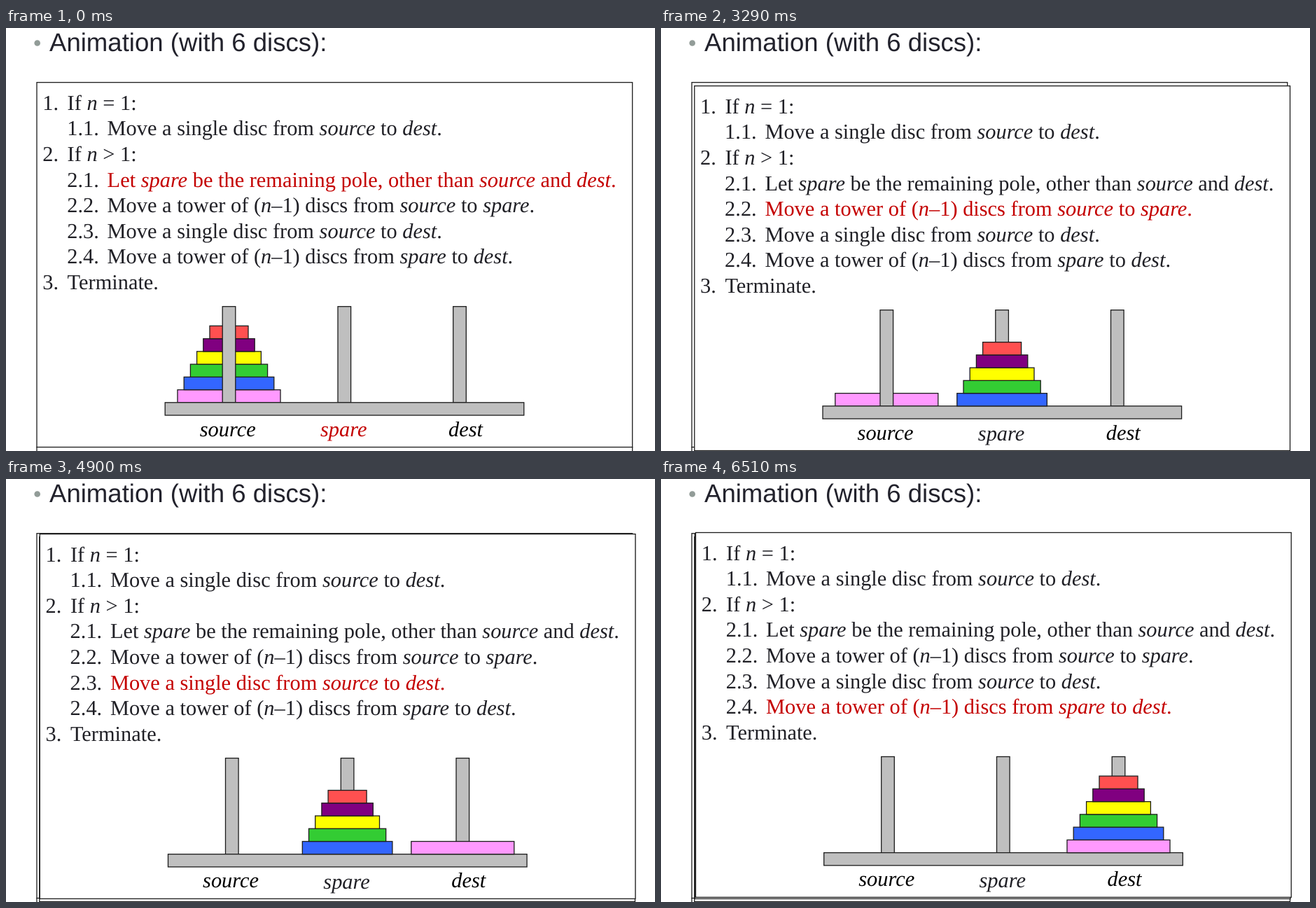
Write an HTML page that moves like this. It is 927 px wide and 604 px high and loops after 8.47 s.

```html
<!DOCTYPE html>
<html lang="en">
<head>
<meta charset="utf-8">
<title>Towers of Hanoi</title>
<style>
html, body { margin: 0; height: 100%; overflow: hidden; background: #fff; }
svg { display: block; width: 927px; height: 604px; }
text { font: 30.4px "Liberation Serif", "Times New Roman", serif; fill: #202026; text-rendering: geometricPrecision; }
.title { font: 36.6px "Liberation Sans", Arial, sans-serif; fill: #22222c; }
.it { font-style: italic; }
.black { fill: #000; }
.red { fill: #c40000; }
rect { stroke: #1c1c1c; stroke-width: 1.3; }
</style>
</head>
<body>
<svg id="stage" viewBox="0 0 927 604">
  <circle cx="44.7" cy="21.5" r="4.3" fill="#929c98"/>
  <text class="title" x="62" y="33">Animation (with 6 discs):</text>
</svg>
<script>
const LOOP = 8470;
const POLES = [318.5, 483.3, 648];
const COLORS = ['#ff99ff', '#3366ff', '#33cc33', '#ffff00', '#800080', '#ff5050']; // largest first
const STEPS = [
  ['1.', 'If *n* = 1:'],
  ['1.1.', 'Move a single disc from *source* to *dest*.'],
  ['2.', 'If *n* > 1:'],
  ['2.1.', 'Let *spare* be the remaining pole, other than *source* and *dest*.'],
  ['2.2.', 'Move a tower of (*n*–1) discs from *source* to *spare*.'],
  ['2.3.', 'Move a single disc from *source* to *dest*.'],
  ['2.4.', 'Move a tower of (*n*–1) discs from *spare* to *dest*.'],
  ['3.', 'Terminate.'],
];
// big: pole of the largest disc; rest: pole of the other five
const PANELS = [
  { at: 0,    x: 0,   y: 0,    active: 3, big: 0, rest: 0 },
  { at: 3290, x: 3.8, y: 5,    active: 4, big: 0, rest: 1 },
  { at: 4900, x: 4.3, y: 0.9,  active: 5, big: 2, rest: 1 },
  { at: 6510, x: 5.5, y: -1.2, active: 6, big: 2, rest: 2 },
];

const rect = (x, y, w, h, fill) =>
  `<rect x="${x}" y="${y}" width="${w}" height="${h}" fill="${fill}"/>`;
const text = (x, y, str, cls = '') => `<text x="${x}" y="${y}" class="${cls}">${str}</text>`;
const rich = str => str.replace('>', '&gt;').replace(/\*(\w+)\*/g, '<tspan class="it">$1</tspan>');

function stepLine([num, body], i, active) {
  const y = 116.8 + i * 36.6;
  const sub = num.length > 2;
  return text(sub ? 87.3 : 52.3, y, num) +
    text(sub ? 144.6 : 87.6, y, rich(body), i === active ? 'red' : '');
}

function disc(size, level, pole) {
  const half = 73.5 - size * 9.2;
  return rect(POLES[pole] - half, 516.6 - level * 18.25, half * 2, 18.25, COLORS[size]);
}

function panel({ x, y, active, big, rest }, index) {
  const first = index === 0;
  const tower = pole => COLORS.map((_, size) => size)
    .filter(size => (size ? rest : big) === pole)
    .map((size, level) => disc(size, level, pole)).join('');
  const edges = first
    ? '<path d="M44 598V612M894.7 598V612" stroke="#1c1c1c" stroke-width="1.3"/>' : '';
  return `<g transform="translate(${x} ${y})">` +
    rect(44, 77.7, 850.7, 520.8, '#fff') + edges +
    STEPS.map((s, i) => stepLine(s, i, active)).join('') +
    tower(0) +
    POLES.map(p => rect(p - 9.3, 397.7, 18.6, 137.2, '#bfbfbf')).join('') +
    rect(227.2, 534.8, 512.6, 18.2, '#bfbfbf') +
    tower(1) + tower(2) +
    text(276.8, 582.5, 'source', 'it black') +
    text(449, first ? 582.5 : 583.8, 'spare', first ? 'it red' : 'it') +
    text(632, 582.5, 'dest', 'it black') + '</g>';
}

const stage = document.getElementById('stage');
stage.insertAdjacentHTML('beforeend', PANELS.map(panel).join(''));
const groups = [...stage.querySelectorAll('g')];

const start = performance.now();
function draw() {
  const t = (performance.now() - start) % LOOP;
  groups.forEach((g, i) => g.setAttribute('visibility', t >= PANELS[i].at ? 'visible' : 'hidden'));
  requestAnimationFrame(draw);
}
draw();
</script>
</body>
</html>
```
